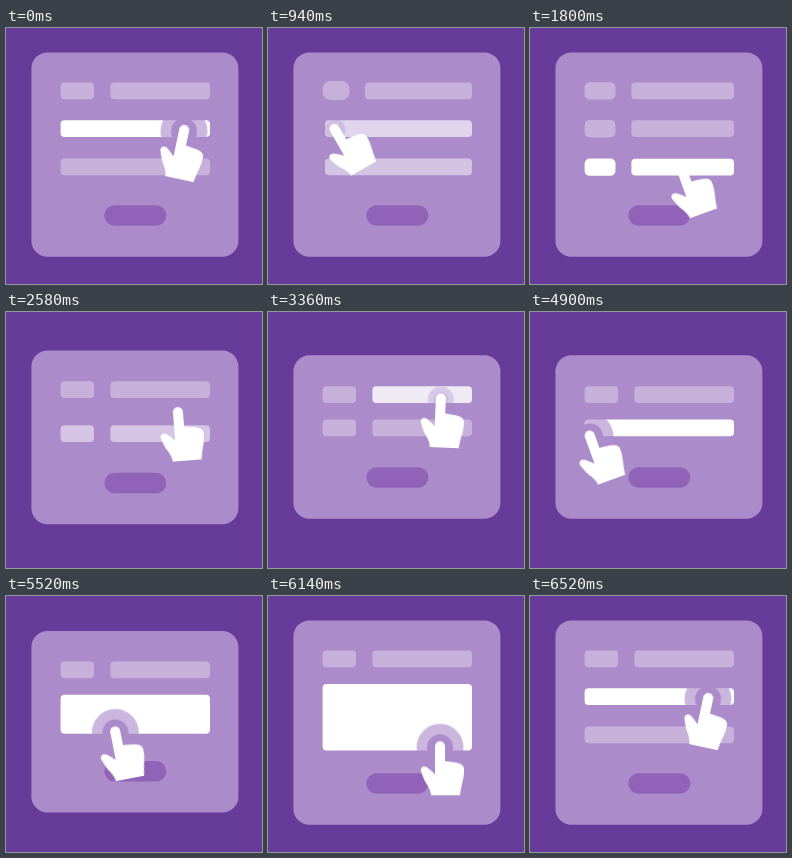
Animation, 256 px wide and 256 px high, one loop 6.64 s. Source, as an HTML page:

```html
<!DOCTYPE html>
<html lang="en">
<head>
<meta charset="utf-8">
<title>Form layout</title>
<style>
:root { --card: #ab8bca; --field: #c7b1db; --on: #fff; }
html, body { margin: 0; width: 100%; height: 100%; overflow: hidden; background: #663b9a; }
svg { display: block; width: 100vw; height: 100vh; }
svg * {
  animation: 6640ms cubic-bezier(.5, 0, .3, 1) infinite;
}
.card { fill: var(--card); x: 25.4px; width: 207px; animation-name: card; }
.button { fill: #9063b8; x: 98.3px; width: 62px; height: 20.6px; animation-name: button; }
.field { fill: var(--field); height: 16.8px; rx: 4px; }
.label1 { x: 54.6px; animation-name: label1; }
.label2 { x: 54.6px; animation-name: label2; }
.label3 { x: 54.6px; animation-name: label3; }
.input1 { animation-name: input1; }
.input2 { animation-name: input2; }
.input3 { animation-name: input3; }
.pointer { animation-name: pointer; }
.ring { fill: var(--card); animation-name: ring; }

@keyframes card {
  0%, 35.241%, 88.554%, 100% { y: 24.4px; height: 204.4px; }
  41.867%, 79.518% { y: 43.3px; height: 163.4px; }
}
@keyframes button {
  0%, 35.241%, 88.554%, 100% { y: 177.2px; }
  41.867%, 79.518% { y: 155.2px; }
}

/* Labels turn into round bullets and back */
@keyframes label1 {
  0%, 10.843% { y: 54.4px; width: 33.4px; height: 16.8px; rx: 4px; }
  14.157% { y: 53px; width: 27px; height: 19px; rx: 8px; animation-timing-function: ease-out; }
  18.976%, 23.193% { y: 53px; width: 20px; height: 20px; rx: 10px; }
  29.819%, 35.241% { y: 54.4px; width: 33.4px; height: 16.8px; rx: 4px; }
  41.867%, 79.518% { y: 74.2px; width: 33.4px; height: 16.8px; rx: 4px; }
  88.554%, 100% { y: 54.4px; width: 33.4px; height: 16.8px; rx: 4px; }
}
@keyframes label2 {
  0%, 14.157% { y: 91px; width: 20px; height: 20px; rx: 10px; opacity: 0; }
  18.976%, 23.193% { y: 91px; width: 20px; height: 20px; rx: 10px; opacity: 1; }
  29.819%, 35.241% { y: 92.3px; width: 33.4px; height: 16.8px; rx: 4px; opacity: 1; }
  38.5%, 100% { y: 100px; width: 33.4px; height: 16.8px; rx: 4px; opacity: 0; }
}
@keyframes label3 {
  0%, 14.157% { y: 129px; width: 20px; height: 20px; rx: 10px; opacity: 0; fill: var(--field); }
  18.976%, 23.193% { y: 129px; width: 20px; height: 20px; rx: 10px; opacity: 1; fill: var(--on); }
  29.819%, 35.241% { y: 130.7px; width: 33.4px; height: 16.8px; rx: 4px; opacity: 1; fill: var(--on); }
  41.867%, 73.795% { y: 107.4px; width: 33.4px; height: 16.8px; rx: 4px; opacity: 1; fill: var(--field); }
  73.796%, 100% { y: 107.4px; width: 33.4px; height: 16.8px; rx: 4px; opacity: 0; fill: var(--field); }
}

/* Inputs 1 and 3 trade places unseen at 47.892%, then visibly swap back */
@keyframes input1 {
  0%, 10.843% { x: 104.4px; y: 54.4px; width: 99.6px; }
  14.157% { x: 97px; y: 54.4px; width: 107px; animation-timing-function: ease-out; }
  18.976%, 23.193% { x: 88px; y: 54.4px; width: 116px; }
  29.819%, 35.241% { x: 104.4px; y: 54.4px; width: 99.6px; }
  41.867%, 47.892% { x: 104.4px; y: 74.2px; width: 99.6px; }
  47.893%, 57.831% { x: 104.4px; y: 107.4px; width: 99.6px; animation-timing-function: cubic-bezier(.25, .5, .3, 1); }
  62.349%, 79.518% { x: 104.4px; y: 74.2px; width: 99.6px; }
  88.554%, 100% { x: 104.4px; y: 54.4px; width: 99.6px; }
}
@keyframes input2 {
  0%, 10.843% { x: 54.6px; y: 92.3px; width: 149.4px; height: 16.8px; fill: var(--on); opacity: 1; }
  14.157% { x: 57px; y: 92.3px; width: 147px; height: 16.8px; fill: #e0d5ec; opacity: 1; }
  18.976%, 23.193% { x: 88px; y: 92.3px; width: 116px; height: 16.8px; fill: var(--field); opacity: 1; }
  29.819%, 35.241% { x: 104.4px; y: 92.3px; width: 99.6px; height: 16.8px; fill: var(--field); opacity: 1; }
  38.5%, 91.264% { x: 104.4px; y: 100px; width: 99.6px; height: 16.8px; fill: var(--field); opacity: 0; }
  91.265%, 92.169% { x: 54.6px; y: 88px; width: 149.4px; height: 66.8px; fill: var(--on); opacity: 1; }
  98.193%, 100% { x: 54.6px; y: 92.3px; width: 149.4px; height: 16.8px; fill: var(--on); opacity: 1; }
}
@keyframes input3 {
  0%, 10.843% { x: 54.6px; y: 130.4px; width: 149.4px; height: 16.8px; fill: var(--field); opacity: 1; }
  14.157% { x: 57px; y: 130.4px; width: 147px; height: 16.8px; fill: #d4c4e4; opacity: 1; }
  18.976%, 23.193% { x: 88px; y: 130.4px; width: 116px; height: 16.8px; fill: var(--on); opacity: 1; }
  29.819%, 35.241% { x: 104.4px; y: 130.7px; width: 99.6px; height: 16.8px; fill: var(--on); opacity: 1; }
  41.867%, 47.892% { x: 104.4px; y: 107.4px; width: 99.6px; height: 16.8px; fill: var(--field); opacity: 1; }
  47.893% { x: 104.4px; y: 74.2px; width: 99.6px; height: 16.8px; fill: var(--field); opacity: 1; }
  53%, 57.831% { x: 104.4px; y: 74.2px; width: 99.6px; height: 16.8px; fill: var(--on); opacity: 1; animation-timing-function: cubic-bezier(.25, .5, .3, 1); }
  62.349%, 67.169% { x: 104.4px; y: 107.4px; width: 99.6px; height: 16.8px; fill: var(--on); opacity: 1; }
  73.795%, 79.518% { x: 54.6px; y: 107.4px; width: 149.4px; height: 16.8px; fill: var(--on); opacity: 1; }
  88.554%, 91.265% { x: 54.6px; y: 88px; width: 149.4px; height: 66.8px; fill: var(--on); opacity: 1; }
  91.266%, 92.169% { x: 54.6px; y: 130.4px; width: 149.4px; height: 16.8px; fill: var(--field); opacity: 0; }
  98.193%, 100% { x: 54.6px; y: 130.4px; width: 149.4px; height: 16.8px; fill: var(--field); opacity: 1; }
}

@keyframes pointer {
  0%, 1.506% { transform: translate(178px, 103px) rotate(12deg); }
  7.229% { transform: translate(87px, 65px) rotate(0deg); }
  10.843% { transform: translate(87px, 65px) rotate(0deg); animation-timing-function: ease-in; }
  14.157% { transform: translate(67px, 101.5px) rotate(-30deg); animation-timing-function: ease-out; }
  18.976%, 23.193% { transform: translate(64px, 140px) rotate(-28deg); }
  29.819%, 35.241% { transform: translate(172px, 142.5px) rotate(-18deg); }
  41.867%, 47.892% { transform: translate(172px, 87.5px) rotate(0deg); }
  57.831% { transform: translate(177px, 87px) rotate(15deg); animation-timing-function: cubic-bezier(.25, .5, .3, 1); }
  62.349%, 67.169% { transform: translate(177.5px, 121px) rotate(17deg); }
  73.795%, 79.518% { transform: translate(60px, 124.5px) rotate(-20deg); }
  88.554%, 92.169% { transform: translate(172px, 151.5px) rotate(0deg); }
  98.193%, 100% { transform: translate(178px, 103px) rotate(12deg); }
}
@keyframes ring {
  0%, 10.843% { transform: scale(1); opacity: 1; }
  14.157% { transform: scale(.45); opacity: .5; }
  16%, 47.892% { transform: scale(0); opacity: 0; }
  54%, 100% { transform: scale(1); opacity: 1; }
}
</style>
</head>
<body>
<svg viewBox="0 0 256 256">
  <rect class="card" rx="16"/>
  <rect class="button" rx="10.3"/>
  <rect class="field label1"/>
  <rect class="field label2"/>
  <rect class="field label3"/>
  <rect class="field input1"/>
  <rect class="field input3"/>
  <rect class="field input2"/>
  <g class="pointer">
    <g class="ring">
      <circle r="23.5" fill-opacity=".62"/>
      <circle r="13"/>
    </g>
    <path fill="#fff" d="M-5-1A5 5 0 0 1 5-1V14C9 14 15 15 19 16Q25 18 24 24C24 32 21 38 20 48H-9C-9 42-13 38-16 32L-19 24C-20 20-16 18-13 20Q-9 23-5 27Z"/>
  </g>
</svg>
</body>
</html>
```
